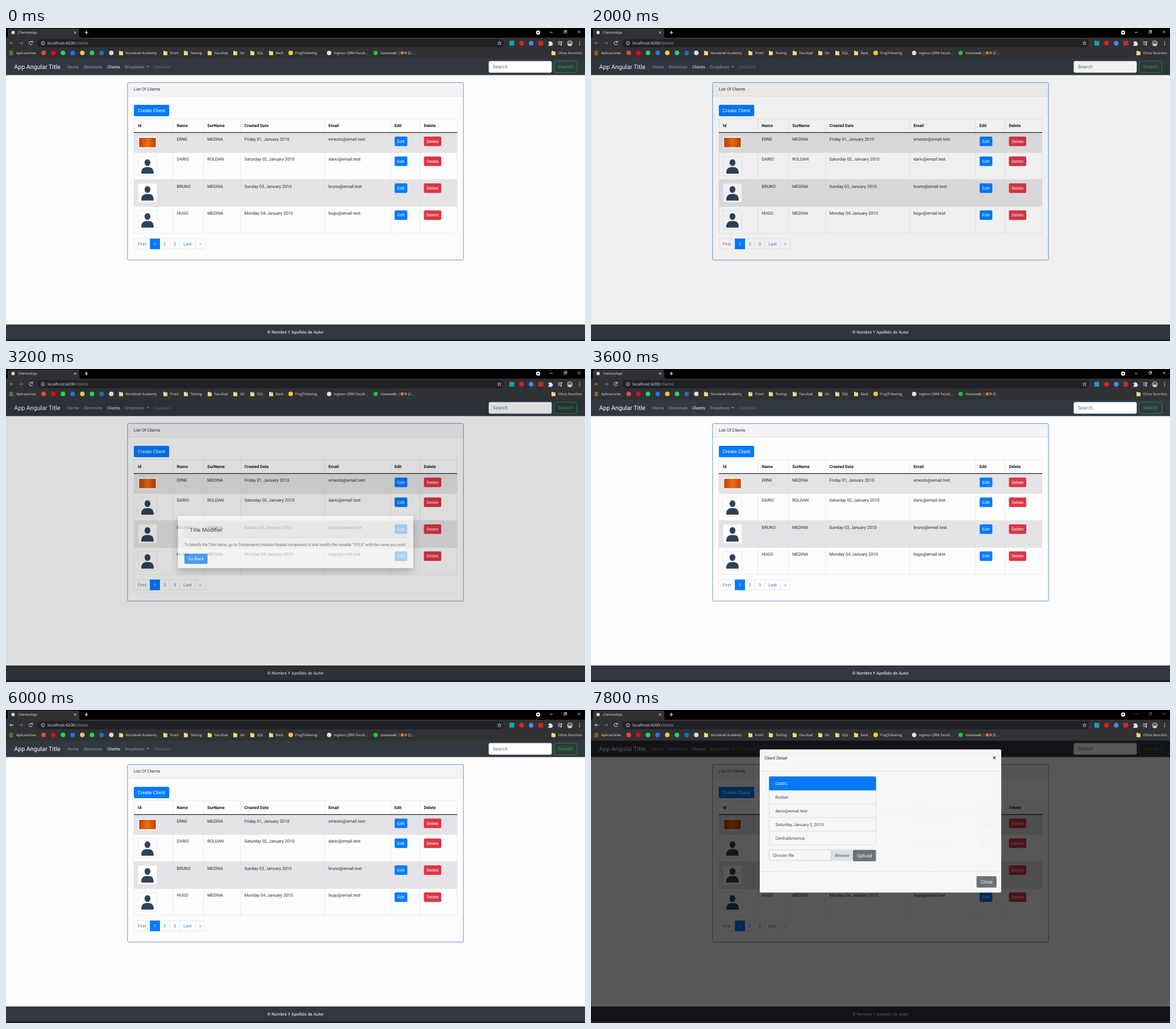
Recreate the animation shown at these times as an HTML page. Size 1019 by 550 pixels, loop 8000 ms.

```html
<!DOCTYPE html>
<html lang="es">
<head>
<meta charset="utf-8">
<title>ClientesApp</title>
<style>
html, body { margin: 0; width: 100%; height: 100%; overflow: hidden; background: #000; }
svg { display: block; width: 1019px; height: 550px; font-family: Roboto, sans-serif; text-rendering: geometricPrecision; }
.ui { font-family: "Open Sans", "Noto Sans", sans-serif; }
</style>
</head>
<body>
<svg id="stage" viewBox="0 0 1019 550" xmlns="http://www.w3.org/2000/svg">
  <defs>
    <filter id="shadow" x="-10%" y="-30%" width="120%" height="170%">
      <feDropShadow dx="0" dy="6" stdDeviation="6" flood-opacity=".35"/>
    </filter>
    <linearGradient id="fire" x2="1">
      <stop offset="0" stop-color="#c93a0a"/><stop offset=".5" stop-color="#e8730f"/><stop offset="1" stop-color="#c93a0a"/>
    </linearGradient>
  </defs>
  <g id="page"></g>
  <rect id="dim" y="54" width="1019" height="493"/>
  <g id="tip"></g>
  <g id="detail"></g>
  <g id="chrome" class="ui"></g>
</svg>
<script>
const $ = id => document.getElementById(id);
const BLUE = '#007bff', RED = '#dc3545', GREY = '#6c757d', INK = '#2b2f33';

// Shape helpers return SVG markup
const rect = (x, y, w, h, fill, more = '') =>
  `<rect x="${x}" y="${y}" width="${w}" height="${h}" fill="${fill}" ${more}/>`;
const box = (x, y, w, h, fill, stroke, r = 0) =>
  rect(x, y, w, h, fill, `stroke="${stroke}" stroke-width=".7" rx="${r}"`);
const dot = (x, y, r, fill) => `<circle cx="${x}" cy="${y}" r="${r}" fill="${fill}"/>`;
const path = (d, stroke, w = 1, fill = 'none') =>
  `<path d="${d}" stroke="${stroke}" stroke-width="${w}" fill="${fill}"/>`;
const text = (x, y, s, size = 7.47, fill = INK, more = '') =>
  `<text x="${x}" y="${y}" font-size="${size}" fill="${fill}" ${more}>${s}</text>`;
const mid = (x, y, s, size, fill, more = '') =>
  text(x, y, s, size, fill, 'text-anchor="middle" ' + more);
const button = (x, y, w, h, s, fill, size = 7.47) =>
  rect(x, y, w, h, fill, 'rx="2"') + mid(x + w / 2, y + h / 2 + size * .36, s, size, '#fff');

function drawChrome() {
  const pale = '#e8eaed';
  let s = rect(0, 0, 1019, 17, '#000') + rect(0, 17, 1019, 37, '#303134');
  s += path('M0 17Q3 17 3 13V4Q3 1 6 1H126Q129 1 129 4V13Q129 17 132 17Z', 'none', 0, '#303134');
  s += dot(12.5, 8, 3, '#d8d8d8') + text(21, 10.3, 'ClientesApp', 6.1, pale);
  s += path('M119.7 6l4 4m0-4l-4 4', pale, .9) + path('M138.5 8h6m-3-3v6', '#fff', 1.1);
  s += dot(936.5, 8, 3.7, '#f1f1f1') + path('M934.5 7h4l-2 2.6z', 'none', 0, '#111');
  s += `<g id="controls">${path('M957 7.5h5M982 5.5h3.6v3.6H982zM983.2 5.5V4.3h3.6v3.6h-1.2M1006.5 4.5l4.5 4.5m0-4.5l-4.5 4.5', '#eee', .8)}</g>`;

  s += `<g id="back">${path('M13.5 26.5H6.8m3-3l-3 3l3 3', pale)}</g>`;
  s += path('M23 26.5h6.7m-3-3l3 3l-3 3', '#75777a');
  s += path('M46 24.4A3 3 0 1 0 46.5 27.5M46.7 22.7v2.4h-2.4', pale);
  s += rect(55, 19.5, 821, 14.5, '#202124', 'rx="7.2"');
  s += `<circle cx="65" cy="26.6" r="3" fill="none" stroke="${pale}" stroke-width=".8"/>` + path('M65 26v2.2m0-3.6v.7', pale, .8);
  s += text(73, 29.1, 'localhost:4200<tspan fill="#9aa0a6">/clients</tspan>', 7.13, pale);
  const star = Array.from({length: 10}, (_, i) => {
    const a = i * Math.PI / 5, r = i % 2 ? 1.5 : 3.5;
    return (868.5 + r * Math.sin(a)).toFixed(1) + ' ' + (26.8 - r * Math.cos(a)).toFixed(1);
  });
  s += path('M' + star.join('L') + 'Z', pale, .7);
  s += rect(886, 22.6, 8.4, 8.4, '#1d9fb4') + dot(907.3, 26.8, 4.3, '#e02020') + dot(924.3, 26.8, 4.2, '#4f86e8');
  s += rect(937, 22.8, 8.4, 8, '#c9282d');
  s += path('M954.5 24.5h2.2a1.3 1.3 0 1 1 2.6 0h2v2.2a1.3 1.3 0 1 1 0 2.6v2h-6.8v-2.4a1.2 1.2 0 1 0 0-2.2z', 'none', 0, pale);
  s += path('M971.5 24h7m-7 2.5h5m-5 2.5h3.5', pale, .9) + path('M977.5 29.5v-5h2', pale, .9) + dot(976.8, 29.5, 1.2, pale);
  s += dot(992.3, 26.8, 5.2, '#8d8780') + path('M988.5 30.2a4 4 0 0 1 7.6 0a5 5 0 0 1-7.6 0z', 'none', 0, '#d0c6b4') + dot(992.3, 25.3, 1.8, '#51483f');
  for (const y of [24, 26.7, 29.4]) s += dot(1009.5, y, .8, pale);

  const tints = ['#ea4335', '#fbbc04', '#34a853'];
  for (let i = 0; i < 9; i++)
    s += rect(5.5 + i % 3 * 2.7, 40.4 + Math.floor(i / 3) * 2.7, 1.8, 1.8, tints[i % 3]);
  const mark = (x, s) => text(x, 46.2, s, 6.07, pale);
  s += mark(18, 'Aplicaciones');
  ['#e34a3f', '#f00', '#1ed760', '#1877f2', '#e9c84c', '#25d366', '#0a76c4', '#e8d6d6']
    .forEach((c, i) => s += dot(66.3 + i * 17, 43.7, 4, c));
  const folder = x => path(`M${x} 40.2h3l.8 1h3.2v6.6h-7z`, 'none', 0, '#f5d67b');
  [[199, 'Nordaviel Academy'], [277, 'Front'], [313, 'Testing'], [355, 'Facultad'], [400, 'Git'], [430, 'SQL'], [463, 'Back'], [960, 'Otros favoritos']]
    .forEach(([x, name]) => s += folder(x) + mark(x + 11.7, name));
  s += dot(501, 43.8, 4, '#f2cb2e') + mark(509, 'FrogTinkering');
  s += dot(568.7, 43.8, 3.9, '#dfe1e5') + mark(577, 'Ingreso QRM Facult...');
  s += dot(650.5, 43.8, 3.8, '#22c43b') + mark(659, 'clasesweb |') + dot(697.2, 43.8, 2.8, '#e5742c');
  s += path('M702 41.5l4 2.2l-4 2.2z', pale, .7) + mark(707.5, '[C...');
  $('chrome').innerHTML = s;
}

function drawTable() {
  const cols = [225.3, 293.8, 347.5, 412.8, 560.8, 677, 728.7, 793.8];
  const tops = [184, 219, 266.2, 313.7];
  const line = '#dfe1e5';
  let s = rect(225, 184, 569, 35, '#e4e3e6') + rect(225, 266.2, 569, 47.5, '#e4e3e6');
  for (const x of cols) s += path(`M${x} 159.5V361`, line, .7);
  for (const y of [159.5, 219, 266.2, 313.7, 361]) s += path(`M225 ${y}H794`, line, .7);
  s += path('M225 183.7H794', '#25282c', 1.2);
  ['Id', 'Name', 'SurName', 'Created Date', 'Email', 'Edit', 'Delete']
    .forEach((h, i) => s += text(cols[i] + 6.7, 174, h, 7.3, '#17191c', 'font-weight="700"'));
  const people = [
    ['ERNE', 'MEDINA', 'Friday 01', 'ernesto'],
    ['DARIO', 'ROLDAN', 'Saturday 02', 'dario'],
    ['BRUNO', 'MEDINA', 'Sunday 03', 'bruno'],
    ['HUGO', 'MEDINA', 'Monday 04', 'hugo']
  ];
  people.forEach(([name, last, day, mail], i) => {
    const y = tops[i];
    [name, last, day + ', January 2010', mail + '@email.test']
      .forEach((v, k) => s += text(cols[k + 1] + 6.7, y + 14.3, v));
    s += button(684, y + 6.7, 22.3, 16.8, 'Edit', BLUE) + button(735.5, y + 6.7, 30.5, 16.8, 'Delete', RED);
    s += box(232.2, y + 6.7, 33.5, i ? 33.7 : 21, '#fdfdfd', '#dee2e6', 2);
    s += i
      ? path(`M238 ${y + 36}q0-9.5 8-10.5h6q8 1 8 10.5q0 1-1 1h-20q-1 0-1-1z`, 'none', 0, '#2c4359') +
        `<ellipse cx="249" cy="${y + 17.6}" rx="5.5" ry="6.3" fill="#2c4359" stroke="#fdfdfd" stroke-width=".8"/>`
      : rect(234.4, y + 9, 29.2, 16.5, 'url(#fire)');
  });
  return s;
}

function drawPage() {
  let s = rect(0, 54, 1019, 496, '#fdfdfd') + rect(0, 54, 1019, 28.7, '#31383f');
  s += text(14.3, 72, 'App Angular Title', 10.67, '#fff');
  [[108.3, 'Home', '#9a9ea2'], [137, 'Directives', '#9a9ea2'], [178, 'Clients', '#fff'], [209.3, 'Dropdown', '#9a9ea2'], [260.3, 'Disabled', '#63686d']]
    .forEach(([x, v, c]) => s += text(x, 70.6, v, 7.47, c));
  s += path('M247.2 67h4.4l-2.2 2.3z', 'none', 0, '#9a9ea2');
  s += box(849.8, 58.3, 110.4, 20, '#fff', '#ced4da', 2.2) + text(856.8, 71.3, 'Search', 8.53, GREY);
  s += box(964.7, 58.3, 40, 20, 'none', '#28a745', 2.2) + mid(984.7, 71.3, 'Search', 8.53, '#28a745');

  s += rect(214, 96, 591, 23.7, '#f4f4f6') + path('M214 119.7H805', '#dadbde', .7);
  s += rect(213.9, 95.8, 591.2, 312, 'none', 'rx="2" stroke="#6592cd" stroke-width="1"');
  s += text(225, 109.7, 'List Of Clients') + button(225, 135, 62.2, 20, 'Create Client', BLUE, 8.53);
  s += drawTable();

  const edges = [225.3, 253.2, 271, 288.3, 305.8, 333.3, 350.3];
  s += box(225.3, 370.2, 125, 18.2, '#fdfdfd', '#dee2e6', 2);
  ['First', '1', '2', '3', 'Last', '»'].forEach((v, i) => {
    const a = edges[i], b = edges[i + 1];
    if (i === 1) s += rect(a, 370, b - a, 18.6, BLUE);
    else if (i > 2) s += path(`M${a} 370V388.5`, '#dee2e6', .7);
    s += mid((a + b) / 2, 382, v, 7.47, i ? i === 1 ? '#fff' : '#2a80e0' : GREY);
  });
  s += rect(0, 521, 1019, 26, '#31383f') + rect(0, 547, 1019, 3, '#1c1f22');
  s += mid(509.5, 537.3, '© Nombre Y Apellido de Autor', 7.47, '#fff');
  $('page').innerHTML = s;
}

function drawTip() {
  $('tip').innerHTML = rect(302.5, 258, 414.3, 92, '#fff', 'rx="2" filter="url(#shadow)"') +
    rect(314, 268.5, 391.5, 27.3, '#f7f7f7') + path('M314 296H705.5', '#d8d8d8', .7) +
    text(323.3, 285.6, 'Title Modifier', 9.7, INK, 'font-weight="500"') +
    text(314, 310.5, 'To Modify the Title Name, go to Components/Header/header.component.ts and modify the variable "TITLE" with the name you want', 6.7, '#444') +
    button(314, 324.5, 40.7, 18, 'Go Back', BLUE, 7.6);
}

function drawDetail() {
  const line = '#d9dbde';
  let s = rect(297, 69.3, 425, 251.5, '#fff', 'rx="2.5"');
  s += text(305.3, 86.8, 'Client Detail') + mid(710, 88, '×', 12, '#555', 'font-weight="700"');
  s += path('M297 107.6H722M297 283.5H722', '#e2e4e7', .7);
  s += box(313.6, 117, 187.8, 120, '#fff', line, 2) + rect(313.3, 116.7, 188.4, 24.5, BLUE, 'rx="2"');
  ['DARIO', 'Roldan', 'dario@email.test', 'Saturday, January 2, 2010', 'CentralAmerica'].forEach((v, i) => {
    const y = 117 + i * 24;
    if (i > 1) s += path(`M313.6 ${y}H501.4`, line, .7);
    s += text(324.4, y + 14.5, v, 7.47, i ? '#444a50' : '#fff');
  });
  s += box(313.6, 246, 147.5, 18.3, '#fff', '#c8cdd2', 2) + text(320, 257.6, 'Choose file', 7.47, '#495057');
  s += rect(422.7, 246.3, 38.3, 17.7, '#e5e9ec') + path('M422.7 246V264.3', '#c8cdd2', .7);
  s += mid(442, 257.6, 'Browse', 7.47, '#495057');
  s += button(461, 245.8, 40.5, 20, 'Upload', GREY, 8.53) + button(678.5, 292, 35.3, 20, 'Close', GREY, 8.53);
  $('detail').innerHTML = s;
}

// Linear interpolation over [time, value] keys
function track(keys, t) {
  let [t0, v0] = keys[0];
  for (const [t1, v1] of keys) {
    if (t < t1) return t <= t0 ? v0 : v0 + (v1 - v0) * (t - t0) / (t1 - t0);
    t0 = t1; v0 = v1;
  }
  return v0;
}

const LOOP = 8000, STEP = 200;
const tipFade = [[2200, 0], [2600, .66], [2800, .95], [3000, 1], [3600, 0]];
const tipDim = [[1800, 0], [2000, .05], [2600, .13], [3000, .19], [3600, 0]];
const detailFade = [[6400, 0], [6600, .14], [7000, .5], [7400, .79], [7800, .95]];

function render(time) {
  const t = Math.floor(time % LOOP / STEP) * STEP;
  const detail = track(detailFade, t);
  $('tip').setAttribute('opacity', track(tipFade, t));
  $('detail').setAttribute('opacity', detail);
  $('dim').setAttribute('opacity', track(tipDim, t) + detail * .69);
  $('back').setAttribute('opacity', t < 4000 ? .45 : 1);
  $('controls').setAttribute('opacity', t < 7800 ? 1 : .4);
}

drawChrome();
drawPage();
drawTip();
drawDetail();
const start = performance.now();
function tick() {
  render(performance.now() - start);
  requestAnimationFrame(tick);
}
tick();
</script>
</body>
</html>
```
